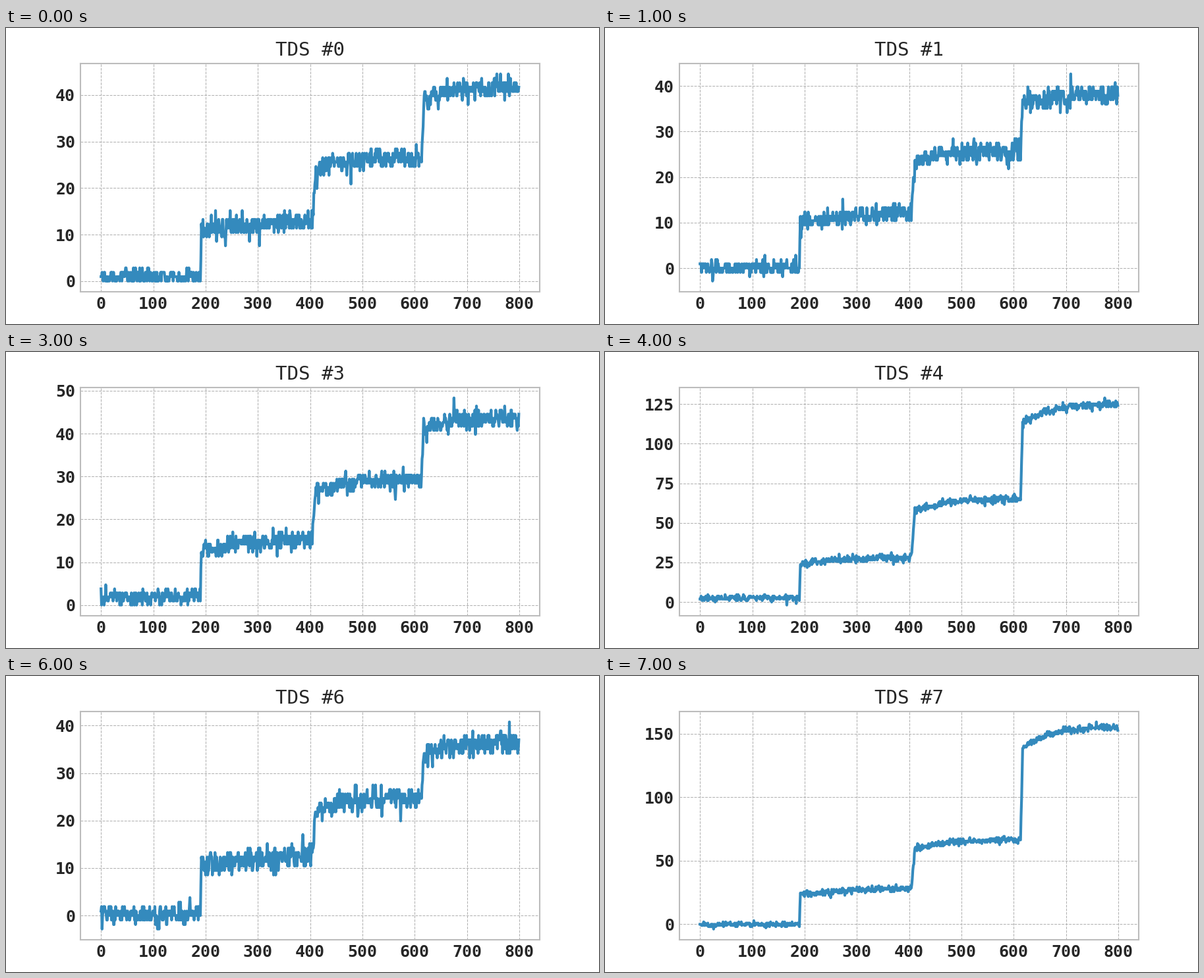
These frames come from a looping animation (900x450 px, 8 s). A matplotlib script:

```python
import numpy as np
import matplotlib.pyplot as plt
from matplotlib.animation import FuncAnimation
from matplotlib.ticker import MultipleLocator

plt.rcParams.update({
    "font.family": "DejaVu Sans Mono",
    "axes.edgecolor": "#bcbcbc",
    "axes.linewidth": 1.0,
    "axes.grid": True,
    "grid.color": "#b2b2b2",
    "grid.linestyle": "--",
    "grid.linewidth": 0.5,
})

N = 800
STEP = 0.948  # sensor resolution
INK = "#262626"
X = np.arange(N)

# Start, ramp length and settling time of each rise.
RISES = ((190, 2, 150), (404, 7, 45), (613, 4, 50))
JUMP = 0.78  # share of a rise taken at once

# Plateau levels, noise, lowest and highest reading (in steps), tick spacing.
SENSORS = [
    ((0.9, 13.6, 26.8, 42.0), 1.25, 0, 47, 10),
    ((0.2, 13.0, 26.0, 38.5), 1.25, -3, 45, 10),
    ((0.0, 13.6, 26.2, 36.3), 1.30, -5, 43, 10),
    ((1.8, 16.0, 29.4, 44.0), 1.25, 0, 51, 10),
    ((2.5, 30.0, 65.5, 125.5), 1.35, -2, 136, 25),
    ((0.7, 13.6, 24.0, 33.0), 1.50, -2, 39, 10),
    ((0.2, 13.4, 25.0, 36.5), 1.40, -3, 43, 10),
    ((0.0, 30.0, 67.3, 156.0), 1.50, -4, 168, 50),
]


def staircase(levels):
    y = np.full(N, levels[0])
    for (start, ramp, settle), rise in zip(RISES, np.diff(levels)):
        t = np.maximum(X - start, 0)
        jump = np.minimum(t / ramp, 1)
        y += rise * (JUMP * jump + (1 - JUMP) * (1 - np.exp(-t / settle)))
    return y


def record(seed, levels, noise, low, high):
    rng = np.random.default_rng(seed)
    spread = noise * np.where(X < RISES[0][0], 0.8, 1)
    steps = np.round(staircase(levels) / STEP + spread * rng.normal(size=N))
    steps = np.clip(steps, low, high)
    steps[steps.argmin()] = low
    steps[steps.argmax()] = high
    return steps * STEP


traces = [record(i, *sensor[:4]) for i, sensor in enumerate(SENSORS)]

fig, ax = plt.subplots(figsize=(6, 3), dpi=150, facecolor="white")
ax.set_xlim(-0.05 * (N - 1), 1.05 * (N - 1))
ax.xaxis.set_major_locator(MultipleLocator(100))
ax.tick_params(length=0, pad=3.5, labelsize=12, labelcolor=INK)
title = ax.set_title("", fontsize=14, color=INK)
line, = ax.plot([], [], color="#348ABD", lw=2)


def show(i):
    y, tick = traces[i], SENSORS[i][-1]
    margin = 0.05 * np.ptp(y)
    line.set_data(X, y)
    ax.set_ylim(y.min() - margin, y.max() + margin)
    ax.yaxis.set_major_locator(MultipleLocator(tick))
    for label in ax.get_xticklabels() + ax.get_yticklabels():
        label.set_fontweight("bold")
    title.set_text(f"TDS #{i}")
    return line, title


anim = FuncAnimation(fig, show, frames=len(traces), init_func=lambda: show(0),
                     interval=1000, repeat=True, repeat_delay=0)
plt.show()
```
